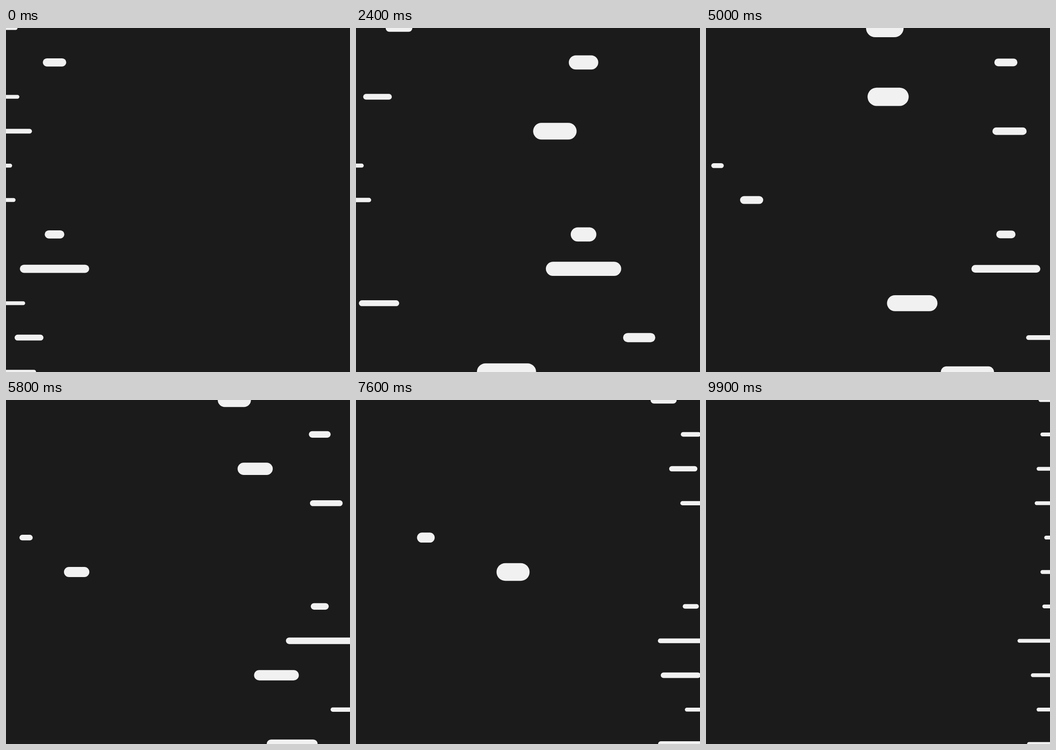
Animation, 748 px wide and 748 px high, one loop 10000 ms. Source, as an HTML page:

```html
<!DOCTYPE html>
<html lang="en">
<head>
<meta charset="utf-8">
<title>Easing lines</title>
<style>
  html, body { margin: 0; width: 100%; height: 100%; overflow: hidden; background: #1b1b1b; }
  svg { display: block; width: 100%; height: 100%; }
  line { stroke: #f1f1f1; stroke-linecap: round; }
</style>
</head>
<body>
<svg id="stage" viewBox="0 0 1080 1080"></svg>
<script>
const SIZE = 1080, LOOP = 10000, STEPS = 100;
const THIN = 12, THICK = 60;

const easeOut = f => t => 1 - f(1 - t);
const easeInOut = f => t => t < 0.5 ? f(2 * t) / 2 : 1 - f(2 - 2 * t) / 2;

const quad = t => t * t;
const cubic = t => t ** 3;
const expo = t => t <= 0 ? 0 : 2 ** (10 * (t - 1));
const circ = t => 1 - Math.sqrt(1 - t * t);

// [easing, length], top to bottom
const rows = [
  [easeInOut(quad), 60],
  [easeOut(circ), 48],
  [easeInOut(cubic), 72],
  [easeOut(cubic), 84],
  [expo, 24],
  [cubic, 48],
  [easeOut(circ), 36],
  [easeOut(circ), 192],
  [easeInOut(circ), 108],
  [easeOut(expo), 72],
  [easeOut(quad), 132]
];

const stage = document.getElementById('stage');
const lines = rows.map(([ease, length], i) => {
  const el = document.createElementNS('http://www.w3.org/2000/svg', 'line');
  const y = i * SIZE / (rows.length - 1);
  el.setAttribute('y1', y);
  el.setAttribute('y2', y);
  stage.append(el);
  return { el, ease, length };
});

function draw(t) {
  for (const { el, ease, length } of lines) {
    const u = ease(t);
    const x = u * SIZE;
    // thickest at mid-stage
    const width = THIN + (THICK - THIN) * (1 - Math.abs(2 * u - 1));
    el.setAttribute('x1', x - length / 2);
    el.setAttribute('x2', x + length / 2);
    el.setAttribute('stroke-width', width);
  }
}

const start = performance.now();
function tick() {
  const time = Math.max(0, performance.now() - start) % LOOP;
  draw((Math.floor(time / LOOP * STEPS) + 1) / STEPS);
  requestAnimationFrame(tick);
}
tick();
</script>
</body>
</html>
```
